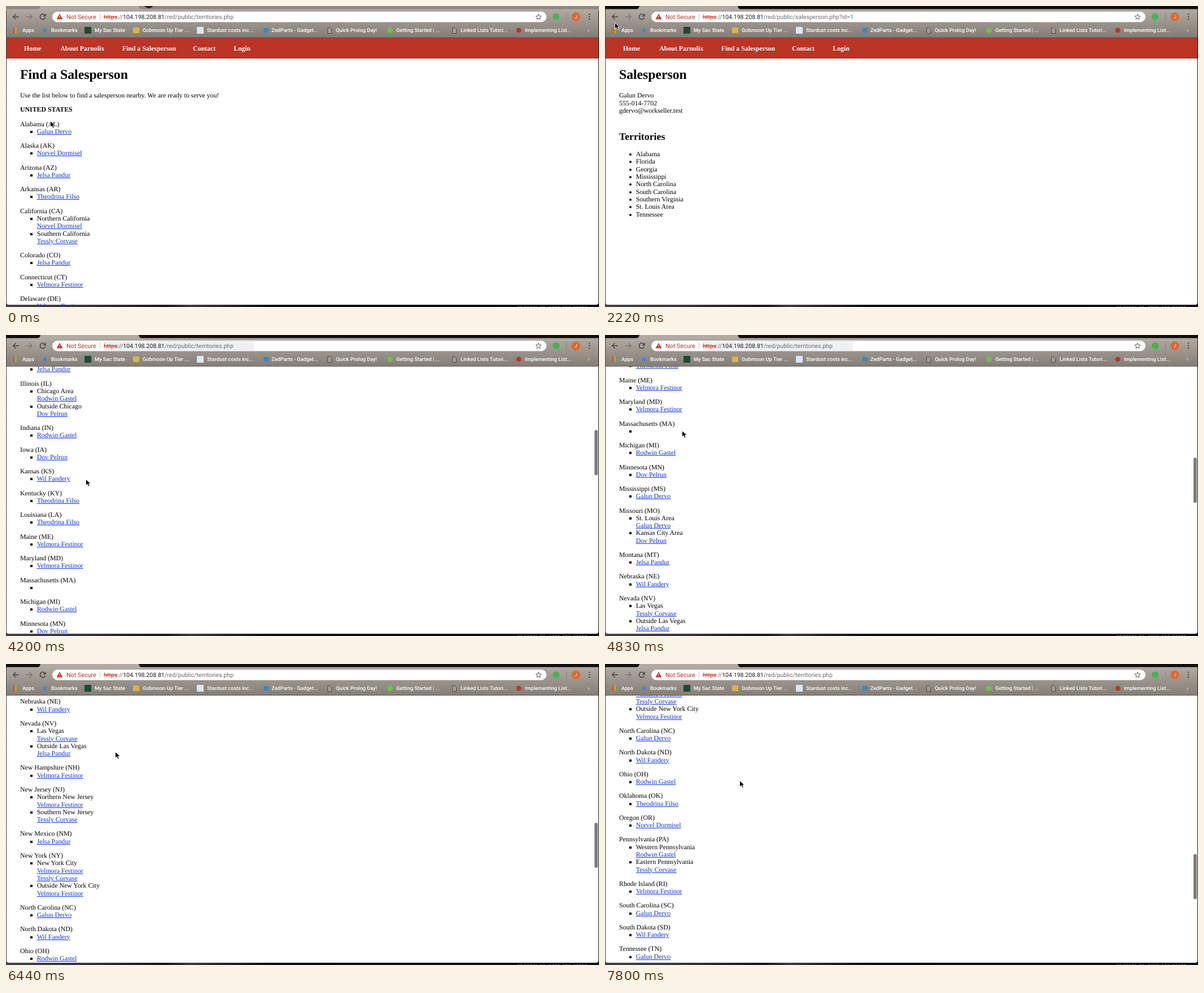
An HTML page for the animation above (8000 ms loop, 1050 by 533 pixels).

```html
<!DOCTYPE html>
<html lang="en">
<head>
<meta charset="utf-8">
<title>Find a Salesperson</title>
<style>
  html, body { margin: 0; width: 100%; height: 100%; overflow: hidden; }
  body { position: relative; background: #6b6762; text-rendering: geometricPrecision; }
  #stage { position: absolute; left: 0; top: 0; width: 1050px; height: 533px; overflow: hidden;
    background: linear-gradient(90deg, #45423f, #3a3836 12%, #191817 27%, #3d3a38 31%, #2a2827 36%, #0c0c0d 45%, #111); }
  #chrome, #over { position: absolute; left: 0; top: 0; }
  #chrome { font: 500 9.2px Roboto, sans-serif; }
  .url { font: 400 10.55px Roboto, sans-serif; }
  #view { position: absolute; left: 1px; top: 56px; width: 1048px; height: 473px; overflow: hidden;
    background: #fff; border-radius: 0 0 4px 4px;
    font: 11.852px/13.333px "Liberation Serif", "Times New Roman", serif; color: #000; }
  .page { position: absolute; left: 0; top: 0; width: 100%; }
  nav { position: relative; height: 37px; background: #bb3425; border-bottom: 1px solid #a52d20; box-sizing: border-box; }
  nav b { position: absolute; top: 13px; color: #fff; white-space: nowrap; }
  main { display: flow-root; padding-left: 24px; }
  h1 { font-size: 23.7px; line-height: 27.4px; margin: 15.9px 0; }
  h2 { font-size: 17.8px; line-height: 20px; margin: 28.8px 0 15.2px; }
  p { margin: 0 0 11.852px; }
  p.card { margin: 0; }
  ul { list-style: none; margin: 0 0 11.852px; padding-left: 29.63px; }
  li { position: relative; min-height: 13.333px; }
  li::before { content: ""; position: absolute; left: -12px; top: 5px; width: 4px; height: 4px; background: #000; }
  .disc li::before { border-radius: 50%; }
  u { color: #0a32ee; text-decoration-thickness: 1px; text-underline-offset: 1px; }
  #thumb { position: absolute; left: 1041px; top: 0; width: 6px; height: 80px; border-radius: 3px; background: #7d7d7d; }
  #status { position: absolute; left: 0; bottom: 0; width: 351px; height: 15px; padding-left: 5px; box-sizing: border-box;
    background: #dedede; border: solid #b9b9b9; border-width: 1px 1px 0 0; border-radius: 0 3px 0 0;
    font: 8.9px/14px Roboto, sans-serif; color: #555; }
</style>
</head>
<body>
<div id="stage">
  <svg id="chrome" width="1050" height="56">
    <defs>
      <linearGradient id="bar" x2="0" y2="1">
        <stop stop-color="#b0aaa2"/><stop offset=".5" stop-color="#99938b"/><stop offset="1" stop-color="#837d75"/>
      </linearGradient>
    </defs>
    <rect id="strip" width="1050" height="8"/>
    <path d="M56 6Q60 5 61 0H235Q236 5 240 6Z" fill="#b0aaa2"/>
    <circle id="badge" cx="253" cy="-5" r="9" fill="#25221f"/>
    <rect x="1" y="5.5" width="1048" height="50.5" fill="url(#bar)"/>
    <rect x="1" y="55" width="1048" height="1" fill="#6f6962"/>
    <g fill="none" stroke-width="1.5">
      <path d="M23 19H13M17.500 14.300 12.800 19l4.700 4.700" stroke="#47433f"/>
      <path d="M36 19H46M41.500 14.300 46.200 19l-4.700 4.700" stroke="#7d7770"/>
      <path id="reload" d="M69.200 16.800A4.700 4.700 0 1 0 69.500 20.600M70 14v3.700H66.200" stroke="#47433f"/>
      <path id="stop" d="M61 15l8 8M69 15l-8 8" stroke="#47433f"/>
    </g>
    <rect x="82" y="10" width="875" height="18.500" rx="9.250" fill="#fff"/>
    <rect id="wash" x="173" y="11" width="266" height="17" fill="#eff0f3"/>
    <path d="M95 13.800 100.500 23.600H89.500Z" fill="#cf2b20"/>
    <path d="M95 17v3.300M95 21.200v1.200" stroke="#fff"/>
    <path d="M166.500 13.500v11" stroke="#c4c4c4"/>
    <g class="url">
      <text x="107" y="23" fill="#cf2b20" font-size="10.7">Not Secure</text>
      <text x="173" y="23" fill="#666b70"><tspan fill="#cf2b20" text-decoration="line-through">https</tspan>://<tspan fill="#1c1c1e">104.198.208.81</tspan><tspan id="path"></tspan></text>
    </g>
    <path class="star" transform="translate(943 19.500)" fill="none" stroke="#55585c"/>
    <circle cx="974" cy="19" r="6" fill="#46b450"/>
    <path d="M992.500 13v12" stroke="#87817a"/>
    <circle cx="1009" cy="19" r="7.500" fill="#e5652a"/>
    <text x="1009" y="22" fill="#fbe3d8" font-size="8.500" text-anchor="middle">J</text>
    <g fill="#4a4641"><circle cx="1033" cy="14.700" r="1.200"/><circle cx="1033" cy="19" r="1.200"/><circle cx="1033" cy="23.300" r="1.200"/></g>
    <g id="apps"></g>
    <path class="star" transform="translate(69 43)" fill="#3483ee"/>
    <rect x="139" y="37" width="12" height="12" fill="#1d4a35"/>
    <rect x="225" y="38" width="11" height="10" fill="#d9b44a"/>
    <rect x="338" y="37" width="12" height="12" fill="#dce7f3"/>
    <rect x="456" y="39" width="9" height="8" fill="#3d86bd"/>
    <g fill="#a39d95" stroke="#4c4843">
      <path id="doc" d="M569.500 38.500h4l3 3v7h-7Z"/>
      <use href="#doc" x="221"/>
    </g>
    <circle cx="680" cy="43" r="5" fill="#6fc04a"/>
    <circle cx="908" cy="43" r="4.500" fill="#b5382a"/>
    <g id="marks" fill="#fff"></g>
    <text x="1029" y="46" fill="#c9c4bd" font-size="10">»</text>
  </svg>

  <div id="view">
    <div class="page" id="list"></div>
    <div class="page" id="person"></div>
    <div id="thumb"></div>
    <div id="status"></div>
  </div>

  <svg id="over" width="1050" height="533">
    <path d="M906 532h8M918 532.500h22M946 532h10M962 532.500h18M986 532h14M1005 532.500h24" stroke="#77777a" stroke-dasharray="3 2"/>
    <g id="pointer" stroke="#fff" stroke-linejoin="round">
      <path id="arrow" d="M.5.5V11.500L3.200 9.100 5 13.300 7.200 12.400 5.400 8.300H9Z" fill="#000" stroke-width=".9"/>
      <path id="hand" d="M3 7V1.200Q4-.5 5 1.200V5Q6.500 4 7 5.500 8.500 4.700 9 6.200 10.800 5.500 11 7.500 11 11 9.500 14.500H4Q2.500 11.500.2 8.600 0 6.800 1.500 7.200L3 8.800Z" fill="#fff" stroke="#000"/>
    </g>
  </svg>
</div>

<script>
const $ = id => document.getElementById(id);
const LOOP = 8000;

const people = {
  G: 'Galun Dervo', N: 'Norvel Dormisel', J: 'Jelsa Pandur', T: 'Theodrina Filso', C: 'Tessly Corvase',
  V: 'Velmora Festinor', R: 'Rodwin Gastel', D: 'Dov Pelrun', W: 'Wil Fandery'
};

// Each entry: state, code, then either agent keys or "region=keys" items.
const states = `Alabama,AL,G;Alaska,AK,N;Arizona,AZ,J;Arkansas,AR,T
California,CA,Northern California=N,Southern California=C;Colorado,CO,J;Connecticut,CT,V;Delaware,DE,V
Florida,FL,G;Georgia,GA,G;Hawaii,HI,N;Idaho,ID,J;Illinois,IL,Chicago Area=R,Outside Chicago=D
Indiana,IN,R;Iowa,IA,D;Kansas,KS,W;Kentucky,KY,T;Louisiana,LA,T;Maine,ME,V;Maryland,MD,V
Massachusetts,MA,;Michigan,MI,R;Minnesota,MN,D;Mississippi,MS,G;Missouri,MO,St. Louis Area=G,Kansas City Area=D
Montana,MT,J;Nebraska,NE,W;Nevada,NV,Las Vegas=C,Outside Las Vegas=J;New Hampshire,NH,V
New Jersey,NJ,Northern New Jersey=V,Southern New Jersey=C;New Mexico,NM,J
New York,NY,New York City=VC,Outside New York City=V;North Carolina,NC,G;North Dakota,ND,W;Ohio,OH,R
Oklahoma,OK,T;Oregon,OR,N;Pennsylvania,PA,Western Pennsylvania=R,Eastern Pennsylvania=C;Rhode Island,RI,V
South Carolina,SC,G;South Dakota,SD,W;Tennessee,TN,G;Texas,TX,T`.split(/[;\n]/);

const links = keys => [...keys].map(k => `<u>${people[k]}</u>`).join('<br>');
const item = text => {
  const [region, keys] = text.split('=');
  return `<li>${keys ? region + '<br>' + links(keys) : links(region)}</li>`;
};
const stateBlock = line => {
  const [name, code, ...areas] = line.split(',');
  return `${name} (${code})<ul>${areas.map(item).join('')}</ul>`;
};

const nav = '<nav>' + [['Home', 31], ['About Parnolix', 95.3], ['Find a Salesperson', 204.7], ['Contact', 330], ['Login', 402.3]]
  .map(([label, x]) => `<b style="left:${x}px">${label}</b>`).join('') + '</nav>';

$('list').innerHTML = `${nav}<main><h1>Find a Salesperson</h1>
  <p>Use the list below to find a salesperson nearby. We are ready to serve you!</p>
  <p><b>UNITED STATES</b></p>${states.map(stateBlock).join('')}</main>`;

const areas = ['Alabama', 'Florida', 'Georgia', 'Mississippi', 'North Carolina', 'South Carolina',
  'Southern Virginia', 'St. Louis Area', 'Tennessee'];
$('person').innerHTML = `${nav}<main><h1>Salesperson</h1>
  <p class="card">${people.G}<br>555-014-7702<br>gdervo@workseller.test</p>
  <h2>Territories</h2><ul class="disc">${areas.map(a => `<li>${a}</li>`).join('')}</ul></main>`;

$('marks').innerHTML = [['Apps', 29], ['Bookmarks', 80], ['My Sac State', 157], ['Gobmoon Up Tier ...', 242],
  ['Stardust costs inc...', 356], ['ZedParts - Gadget...', 470], ['Quick Prolog Day!', 584],
  ['Getting Started | ...', 691], ['Linked Lists Tutori...', 805], ['Implementing List...', 919]]
  .map(([label, x]) => `<text x="${x}" y="46">${label}</text>`).join('');

const dots = ['#d9483b', '#e9a13b', '#58a55c', '#4285d8'];
$('apps').innerHTML = Array.from({ length: 9 }, (_, i) =>
  `<rect x="${12.5 + i % 3 * 3.7}" y="${38 + Math.floor(i / 3) * 3.7}" width="2.6" height="2.6" fill="${dots[(i + Math.floor(i / 3)) % 4]}"/>`).join('');

const starPath = 'M' + Array.from({ length: 10 }, (_, i) => {
  const r = i % 2 ? 2.3 : 5.2, a = i * Math.PI / 5;
  return `${(r * Math.sin(a)).toFixed(2)} ${(-r * Math.cos(a)).toFixed(2)}`;
}).join('L') + 'Z';
document.querySelectorAll('.star').forEach(s => s.setAttribute('d', starPath));

// Step tracks: [start time, values...]
const pointerTrack = [[0, 78, 203], [150, 98, 224], [1320, 101, 224], [1770, 84, 178], [1920, 52, 104], [2070, 26, 48],
  [2220, 17, 29], [2520, 15, 16], [2970, 72, 128], [3120, 141, 255], [4620, 138, 200], [4830, 136, 169],
  [5610, 160, 164], [5760, 184, 158], [5900, 193, 155], [6670, 198, 146], [6910, 201, 142],
  [7390, 219, 172], [7600, 233, 198], [7800, 238, 206]];
const scrollTrack = [[0, 0], [3420, 68.9], [3570, 180], [3780, 335], [3990, 490], [4200, 625], [4410, 746],
  [4620, 845], [4830, 902.2], [5040, 925], [5250, 932.7], [6050, 980], [6250, 1110], [6440, 1263],
  [6670, 1410], [6910, 1505.5], [7180, 1545], [7390, 1564], [7600, 1573], [7800, 1575.9]];
const thumbTrack = [[0, 0], [3420, 1], [5610, .5], [5760, 0], [6050, 1]];
const statusTrack = [[0, ''], [510, 'https://104.198.208.81/red/public/salesperson.php?id=1'],
  [810, 'Waiting for 104.198.208.81...'], [1770, '']];

const at = (track, t) => track.findLast(row => row[0] <= t).slice(1);
const within = (t, from, to) => t >= from && t < to;
const show = (id, on) => { $(id).style.display = on ? '' : 'none'; };

function draw(t) {
  const [x, y] = at(pointerTrack, t);
  const [scroll] = at(scrollTrack, t);
  const [status] = at(statusTrack, t);
  const onPerson = within(t, 1320, 2820);
  const loading = within(t, 810, 1470) || within(t, 2670, 2820);
  const hovering = within(t, 150, 1320);

  show('person', onPerson);
  show('list', !onPerson);
  $('list').style.transform = `translateY(${-scroll}px)`;
  $('thumb').style.transform = `translateY(${1.5 + scroll * .177}px)`;
  $('thumb').style.opacity = at(thumbTrack, t)[0];
  $('path').textContent = '/red/public/' + (onPerson ? 'salesperson.php?id=1' : 'territories.php');
  show('wash', within(t, 2820, 5610));
  show('status', status);
  $('status').textContent = status;
  show('reload', !loading);
  show('stop', loading);
  show('badge', t < 510);
  $('strip').setAttribute('fill', t < 510 ? '#8d877f' : '#100e0d');
  show('hand', hovering);
  show('arrow', !hovering);
  $('pointer').setAttribute('transform', `translate(${x} ${y})`);
}

const start = performance.now();
function tick() {
  draw((performance.now() - start) % LOOP);
  requestAnimationFrame(tick);
}
tick();
</script>
</body>
</html>
```
